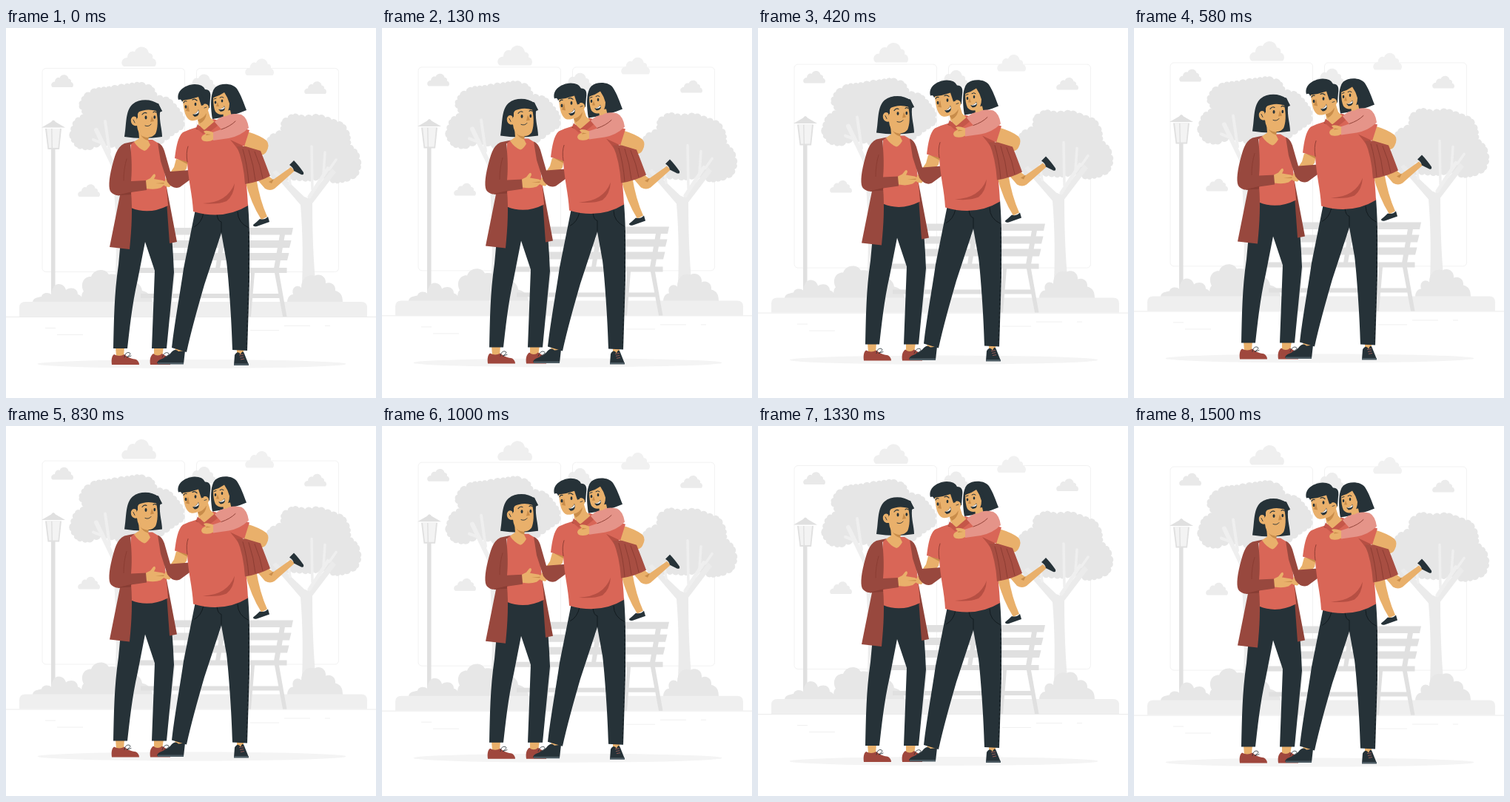
Recreate the animation shown at these times as an HTML page. Size 500 by 500 pixels, loop 1.54 s.

```html
<!DOCTYPE html>
<html lang="en">
<head>
<meta charset="utf-8">
<title>Family in the park</title>
<style>
html, body { margin: 0; width: 100%; height: 100%; overflow: hidden; background: #fff; }
svg { display: block; width: 100%; height: 100%; }
.ink { fill: #263238; }
.red { fill: #d96657; }
.coat { fill: #98483e; }
.skin { fill: #e9b06b; }
.tan { fill: #c88c4a; }
.shoe { fill: #9f473d; }
.line { fill: none; stroke: #263238; stroke-linecap: round; stroke-linejoin: round; }
.fold { fill: none; stroke: #893b32; stroke-linecap: round; stroke-width: .9; }
.seam { fill: none; stroke: #0e161a; stroke-width: .8; }
.limb { fill: none; stroke: #efefef; stroke-linecap: round; }
.bush { fill: #e7e7e7; }
</style>
</head>
<body>
<svg viewBox="0 0 500 500">
<g id="scene">
  <g fill="none" stroke="#f2f2f2">
    <rect x="49" y="54.5" width="192.500" height="275" rx="5"/>
    <rect x="257.500" y="54.500" width="192" height="275" rx="5"/>
    <path d="M0 390.500H500" stroke="#ebebeb"/>
    <path d="M53 405.500H67M69 414.500H104M376 402.500H411M431 402.500H438M330 408.500H369" stroke="#f0f0f0"/>
  </g>
  <g id="clouds"></g>
  <g id="leaves" fill="#e6e6e6"></g>

  <!-- trunks -->
  <path fill="#ededed" d="M146 368C151 310 149 240 143 185L156 180L166 205L176 180H186L174 230C171 280 174 330 178 368Z"/>
  <path class="limb" stroke-width="6" d="M150 196L122 138"/>
  <path class="limb" stroke-width="4" d="M140 168L134 126M131 156L118 151"/>
  <path fill="#ebebeb" d="M399 368C402 320 401 275 398 239L360 195L365 192L403 228L408 230L413 224L441 190L446 195L414 237C414 285 416 330 421 368Z"/>
  <path class="limb" stroke-width="5" d="M410 228L435 190"/>
  <path class="limb" stroke-width="3.500" d="M414 218L413 160M429 198L431 168M437 191L446 178M384 211L381 191"/>

  <!-- lamp -->
  <path fill="#e0e0e0" d="M61 163H66.500V366H61ZM48 134.500L61 127Q64 122 67 127L80 134.500ZM53 136H75L72 164H56.500Z"/>
  <path fill="#f3f3f3" d="M55 136H61L61.500 162H58ZM62.500 136H73L70.500 162H63Z"/>

  <!-- bushes and ground -->
  <path class="bush" d="M36 371C36 364 44 364 48 363C49 357 58 357 61 360C62 350 67 346 71 346C77 346 80 350 81 354C88 349 97 352 97 360C102 361 104 366 104 371Z"/>
  <path class="bush" d="M103 371C101 362 103 357 105 356C99 344 107 335 115 336C119 325 134 324 139 333C150 331 155 337 156 341C170 337 183 345 184 355C193 357 198 364 198 371Z"/>
  <path class="bush" d="M380 371C380 363 385 360 388 360C385 350 394 346 399 351C399 337 409 332 417 335C424 331 433 336 432 345C440 342 446 348 445 355C452 357 455 361 455 371Z"/>
  <path fill="#efefef" d="M18 390V378Q18 370 26 370H480Q488 370 488 378V390Z"/>

  <!-- bench -->
  <path fill="#e0e0e0" d="M218 270H388L386 279.500H216ZM216 287H385.500L383 297H214ZM213 304H382.500L380 314H211ZM180 324H379.500V331H180ZM182 359H372V365H182ZM370 279H377L369 325H362ZM290 279H297L289 325H283ZM363 331H369L379.500 390H374ZM331 331H336L331 390H326ZM222 331H228L222 390H216Z"/>
  <ellipse cx="251" cy="454" rx="208.500" ry="6" fill="#f4f4f4"/>

  <!-- mother: legs -->
  <path class="skin" d="M148 431H160L159 444H149ZM200 431H213L211 444H200Z"/>
  <path class="shoe" d="M143 455C142 448 143 443 146 441Q153 445 160 441C165 446 171 447 176 448Q180 451 180 455ZM195 455C194 448 195 443 199 440Q205 445 211 440L222 447V455Z"/>
  <path class="line" stroke-width=".8" d="M160 445Q161 438 166 438.500Q171 440 163 445L169 443M211 445Q214 437 219 439Q223 441 214 445"/>
  <path class="ink" d="M169 242L218 238C223 262 226 300 227 330L217 433H197L201 328L188 289L178 340C170 375 167 408 164 433H145C146 395 146 360 152 320L157 265Z"/>
  <path fill="#8f4339" d="M205 190L213 194L231 289L221 291L217 235Z"/>

  <!-- mother: hair, neck, top -->
  <path class="ink" d="M160 147C163 130 161 112 171 103C181 95 197 96 206 103L211 112L208 114C207 127 211 137 211 147Q185 151 160 147Z"/>
  <path class="red" d="M169 156L178 151L198 151L208 157C214 185 217 214 219 240Q193 253 169 243L166 200Z"/>
  <path class="skin" d="M179 136L192 145L192 152L195 158Q191 165 187 166Q179 163 173 154L180 149Z"/>
  <path class="tan" d="M181 142Q186 148 193 148L192 152Q184 150 181 142Z"/>
  <path class="skin" d="M178 114Q190 108 203 112C206 124 205 137 202 143Q195 151 184 146Q178 142 177 132C171 133 168 128 169 123C171 118 175 119 178 122Z"/>
  <path class="ink" d="M177 124C177 116 179 112 183 111Q195 106 211 113L206 102L184 98L171 106Z"/>
  <path class="tan" d="M197 119L200 126L195 127Z"/>
  <path class="line" stroke-width="1.100" d="M184 117Q187 113 190 115M199 114Q201 112 203 114"/>
  <path class="line" stroke-width=".9" d="M188 132Q193 134 196 130M172 124L174 128"/>
  <ellipse class="ink" cx="189" cy="121" rx="1.500" ry="2.400"/>
  <ellipse class="ink" cx="200.800" cy="120.500" rx="1.400" ry="2.300"/>

  <!-- father: left forearm -->
  <path class="skin" d="M230 177L246 180L244 190L221 215Q215 215 212 211L216 204L227 188Z"/>
  <path class="tan" d="M230 176L246 180L245 184Z"/>

  <!-- mother: cardigan -->
  <path class="coat" d="M205 155Q211 157 214 166L222 194L248 192L250 204L235 215Q226 219 218 208L209 180Z"/>
  <path class="coat" d="M174 153L160 156C149 161 147 174 143 188C139 204 138 218 142 222Q147 227 154 226L140 296L167 299C170 270 171 245 169 222L190 219V206L169 207C171 187 169 167 168 158Z"/>
  <path class="fold" d="M163 177Q159 190 159 206M152 226L169 222"/>
  <path fill="#873d34" d="M152 226L169 222V225Z"/>
  <path class="skin" d="M189 206L195 203L199 198Q202 196 202 200L200 204L212 206Q217 208 214 212L209 216Q201 219 190 217Z"/>
  <path class="tan" d="M202 210L214 209L213 210.500Z"/>

  <!-- father: legs -->
  <path class="skin" d="M229 430L241 434L240 440L228 440ZM312 433H321V442H312Z"/>
  <path class="ink" d="M204 453C205 447 214 448 222 440Q228 432 233 437L242 436L240 454ZM308 455L309 442Q313 435 317 441Q320 434 322 440L328 455Z"/>
  <path fill="#4c5b63" d="M205 452H240V454.500H205ZM308 453.500H328V456H308Z"/>
  <path fill="none" stroke="#9d5b55" stroke-width=".9" d="M315 442L321 441M316 445L321 444M317 448L322 447"/>
  <path class="ink" d="M256 245L327 238C330 275 329 310 329 340L326 436L306 435C305 395 301 340 298 316L291 277L268 347C258 382 250 410 244 438L224 432C228 397 235 360 240 325Z"/>
  <path class="seam" d="M254 269Q264 264 267 250M313 248Q313 263 328 270M285 251Q286 261 291 262V276"/>
  <path class="seam" stroke-dasharray="3 3" d="M328 275V342L325 432"/>

  <!-- girl: legs, behind the shirt -->
  <path class="skin" d="M323 206L338 202Q343 233 353 255L345 259Q331 237 323 206Z"/>
  <path class="ink" d="M334 266Q339 262 343 258Q349 260 354 255L356 262L339 268Q334 269 334 266Z"/>
  <path class="skin" d="M338 203L351 197L361 205L385 188L390 193L363 217Q357 221 350 217Z"/>
  <path class="tan" d="M355 208L362 204L359 210Z"/>
  <path class="ink" d="M383 185L389 179Q395 185 402 195Q403 199 399 198L389 193Q388 188 383 185Z"/>
  <path class="skin" d="M321 160L326 140Q343 145 352 152Q357 158 352 167Q349 173 340 172Z"/>

  <!-- father: shirt -->
  <path class="red" d="M258 134L280 123L310 132L329 138L322 160L320 159C322 188 326 215 327 240Q294 260 253 248C252 225 246 205 245 181L228 176C230 161 232 147 239 141Q247 137 258 134Z"/>
  <path fill="#b64f43" d="M266 237Q299 236 309 210Q308 226 298 234Q286 239 266 237ZM303 151L320 159L322 180Q317 167 303 151Z"/>
  <path class="fold" stroke="#b64f43" d="M245 181Q243 168 246 160M257 136L264 138"/>
  <path class="skin" d="M259 124L272 108L276 121L283 128Q276 135 267 138L260 130Z"/>
  <path class="tan" d="M259 124Q266 123 271 115Q270 125 262 129Z"/>
  <path fill="#c55749" d="M259 130L268 138L282 126L286 132L276 140L266 143L257 135Z"/>

  <!-- father: head -->
  <path class="ink" d="M233 97C230 86 240 77 255 76Q266 76 269 83Q278 83 276 95L275 108L264 112L250 92Q241 94 238 100Q237 95 233 97Z"/>
  <path class="skin" d="M239 97Q249 95 259 90Q263 94 265 104C269 101 275 103 274 109Q272 115 267 115C264 123 256 126 250 125C243 123 240 113 239 97Z"/>
  <path class="ink" d="M238 98Q239 91 247 88L263 88Q269 96 267 104L264 105Q262 99 260 93Q249 97 238 98Z"/>
  <path class="tan" d="M246 103L248 113L243 112Z"/>
  <path class="line" stroke-width="1.200" d="M240 101Q241 98 244 99M252 97Q255 95 258 98"/>
  <path class="line" stroke-width=".8" d="M268 108L271 107"/>
  <ellipse class="ink" cx="243" cy="106.500" rx="1.400" ry="2.300"/>
  <ellipse class="ink" cx="256" cy="103" rx="1.400" ry="2.300"/>
  <path class="ink" d="M252 117Q258 116 260 110Q263 119 255 120Z"/>
  <path fill="#fff" d="M253 117Q258 115.500 260 111L260.500 114Q258 117 253 117Z"/>

  <!-- girl: skirt and sleeve -->
  <path fill="#a84e42" d="M312 160L324 160L344 166Q350 181 357 200Q342 208 323 211Q321 181 312 160Z"/>
  <path class="fold" d="M320 164Q326 184 328 209M328 165Q335 186 337 206M336 167Q344 186 347 203"/>
  <path class="ink" d="M279 123C276 105 276 87 283 80C290 74 306 74 312 82C318 91 321 101 325 111Q307 119 279 123Z"/>
  <path class="skin" d="M293 112L303 111L305 120L294 122Z"/>
  <path fill="#e59489" d="M282 127Q289 119 298 119Q305 114 318 117Q326 121 328 135Q317 146 301 149L280 152L279 141L291 137Z"/>
  <path class="fold" stroke="#ca786f" d="M291 137Q303 133 310 126"/>
  <path class="skin" d="M264 149Q264 145 270 143L267 140Q270 137 280 141V151Q275 154 269 153Q265 153 264 149Z"/>
  <path class="tan" d="M271 143L277 144L270 145Z"/>

  <!-- girl: head -->
  <path class="skin" d="M280 94Q288 92 295 87Q300 94 302 102Q302 112 296 116Q288 119 283 113Q280 107 280 94Z"/>
  <path class="ink" d="M279 95Q285 92 290 84L295 84Q302 91 305 105Q307 89 295 80L281 84Z"/>
  <path class="tan" d="M286 100L288 106L284 106Z"/>
  <path class="line" stroke-width="1" d="M281 96L284 95M289 94Q292 92 294 94"/>
  <ellipse class="ink" cx="283" cy="100.500" rx="1.300" ry="2.100"/>
  <ellipse class="ink" cx="292" cy="98.500" rx="1.300" ry="2.100"/>
  <path class="ink" d="M287 110Q293 110 295 105Q298 112 290 113Z"/>
  <path fill="#fff" d="M288 110Q293 109 295 106L295.500 108Q293 111 288 110Z"/>
</g>
</svg>
<script>
const LOOP = 1540, STEPS = 37, RISE = 10, LEAD = 65;
const $ = id => document.getElementById(id);

// x, y, width, height, shade
const clouds = [
  [156, 25, 47, 27, "#efefef"],
  [323, 41, 39, 23, "#f1f1f1"],
  [245, 62, 39, 23, "#ededed"],
  [61, 63, 30, 17, "#e9e9e9"],
  [97, 211, 30, 17, "#ececec"],
  [403, 72, 30, 17, "#ebebeb"]
];
const puff = "M3 27C-2 24 0 15 8 15C8 8 14 5 18 7C21-2 35-2 37 9C42 9 43 13 42 16C48 17 48 25 45 27Z";
$("clouds").innerHTML = clouds.map(([x, y, w, h, fill]) =>
  `<path fill="${fill}" d="${puff}" transform="translate(${x} ${y}) scale(${w / 47} ${h / 27})"/>`).join("");

// Closed outline made of small outward bumps
function scallop(pts, size) {
  let d = `M${pts[0]}`;
  pts.forEach(([x, y], i) => {
    const [u, v] = pts[(i + 1) % pts.length];
    const len = Math.hypot(u - x, v - y), n = Math.max(1, Math.round(len / size));
    const r = len / n * 0.62;
    for (let k = 1; k <= n; k++)
      d += `A${r} ${r} 0 0 1 ${x + (u - x) * k / n} ${y + (v - y) * k / n}`;
  });
  return `<path d="${d}Z"/>`;
}
$("leaves").innerHTML =
  scallop([[88, 150], [88, 139], [93, 125], [106, 117], [99, 104], [105, 92], [122, 82], [142, 80],
    [160, 77], [180, 74], [198, 80], [204, 92], [221, 96], [231, 107], [239, 118], [240, 134],
    [222, 146], [200, 162], [165, 168], [147, 160], [128, 157], [110, 164], [96, 161]], 8) +
  scallop([[346, 165], [356, 147], [372, 139], [373, 126], [388, 117], [404, 120], [423, 118], [440, 124],
    [456, 130], [464, 145], [465, 158], [475, 168], [479, 185], [474, 200], [458, 207], [445, 209],
    [430, 203], [408, 206], [385, 204], [364, 207], [353, 194]], 8);

// Steady rise and fall of the whole scene
function draw(ms) {
  const step = Math.floor(ms % LOOP / LOOP * STEPS + 0.1);
  const p = (step * LOOP / STEPS + LEAD) % LOOP / (LOOP / 2);
  const lift = RISE * (p < 1 ? p : 2 - p);
  const rest = RISE * LEAD / (LOOP / 2);
  $("scene").setAttribute("transform", `translate(0 ${(rest - lift).toFixed(2)})`);
}

const start = performance.now();
function tick(now) {
  draw(Math.max(0, now - start));
  requestAnimationFrame(tick);
}
draw(0);
requestAnimationFrame(tick);
</script>
</body>
</html>
```
